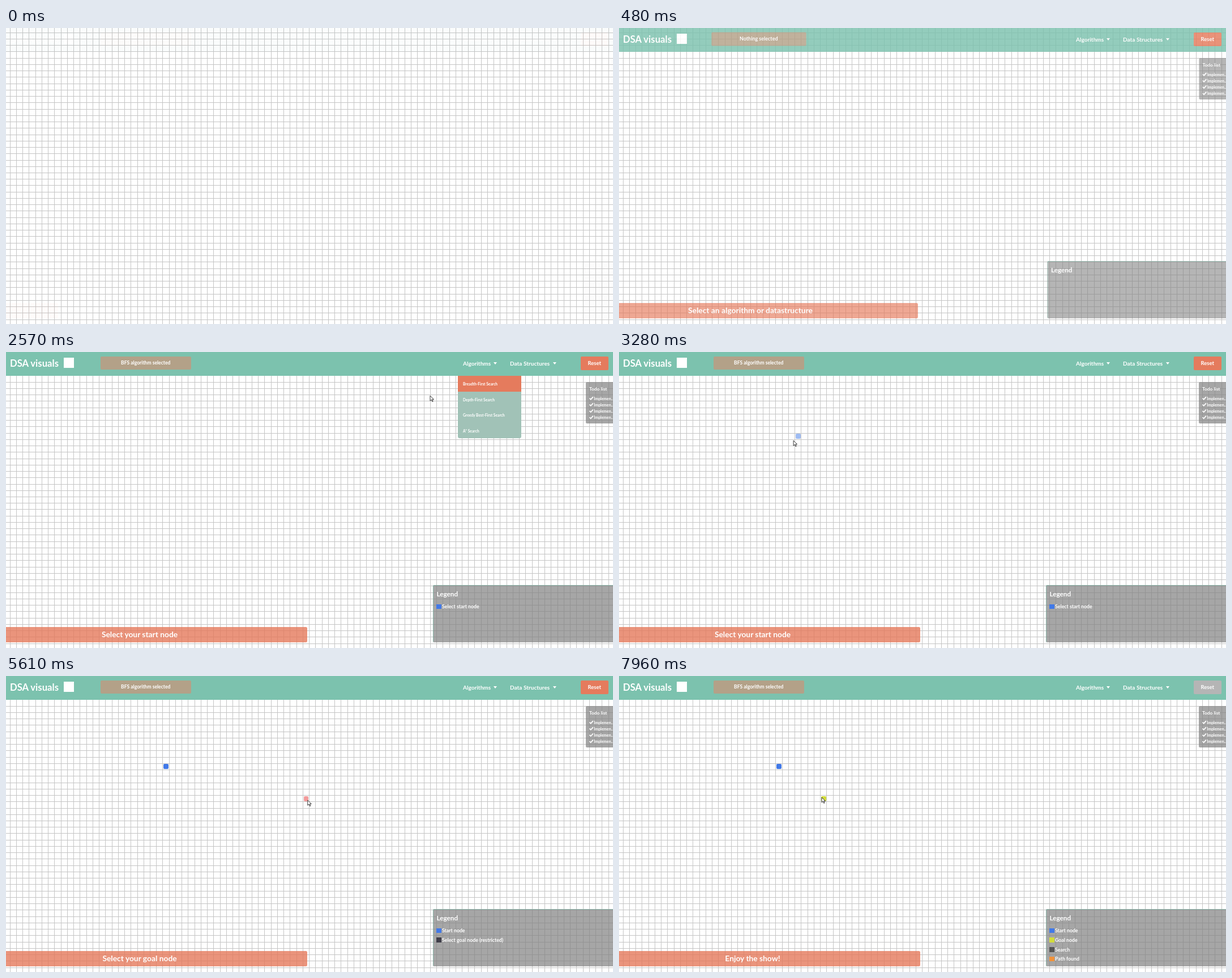
Write an HTML page that moves like this. It is 1072 px wide and 522 px high and loops after 8000 ms.

```html
<!DOCTYPE html>
<html lang="en">
<head>
<meta charset="utf-8">
<title>DSA visuals</title>
<style>
html, body { margin: 0; width: 100%; height: 100%; overflow: hidden; background: #fff; }
#stage { position: relative; width: 1072px; height: 522px; overflow: hidden; color: #fff;
  font: bold 10.1px/1 Lato, "Open Sans", sans-serif; }
#stage * { position: absolute; box-sizing: border-box; }
#stage span { white-space: nowrap; transform: translateY(-50%); }
#stage .mid { left: 50%; top: 50%; transform: translate(-50%, -50%); }
svg { left: 0; top: 0; overflow: visible; }
#grid { stroke: #c5c5c5; shape-rendering: crispEdges; }
.node { width: 8.8px; height: 8.8px; border-radius: 2px; }
#header { width: 1072px; height: 42px; background: #7cc2ae; }
#title { left: 7px; top: 20px; font-size: 16.7px; }
#mark { left: 102px; top: 10px; width: 18px; height: 18px; background: #fff; }
#message { left: 167px; top: 8px; width: 159.5px; height: 22.5px; border-radius: 2px;
  background: #b3a188; font-size: 8.55px; }
.menu { top: 8px; height: 23px; border-radius: 2px; }
.menu span { left: 9px; top: 12px; }
.menu i { right: 9px; top: 10px; border: solid transparent; border-width: 4px 3.6px 0; border-top-color: #fff; }
#algorithms { left: 798px; width: 78px; }
#structures { left: 881px; width: 100px; }
#reset { left: 1015px; top: 8px; width: 48.5px; height: 23.5px; border-radius: 2px; font-size: 9.5px; }
#dropdown { left: 798px; top: 42px; width: 112px; height: 110px; overflow: hidden;
  border-radius: 0 0 3px 3px; background: #a1c2b7; font-size: 6.68px; }
#dropdown div { width: 112px; height: 27.5px; }
#dropdown span { left: 9px; top: 14px; }
.panel { background: rgba(128, 128, 128, .7); border-radius: 2px; }
#todo { left: 1024px; top: 53px; width: 70px; height: 73px; font-size: 6.8px; }
#todo path { fill: none; stroke: #fff; stroke-width: 1.7; }
#legend { left: 754px; top: 411px; width: 400px; height: 101px; font-size: 8.75px;
  box-shadow: inset 1px 1px rgba(124, 194, 174, .6); }
#legend i { left: 6px; width: 8.5px; height: 8.5px; }
#bar { left: -60px; top: 484.5px; width: 592px; height: 27px; border-radius: 2.5px;
  background: rgba(229, 122, 92, .8); font-size: 13.8px; }
#cursor path { fill: #fff; stroke: #222; stroke-width: .9; }
</style>
</head>
<body>
<div id="stage">
  <svg width="1072" height="522"><path id="grid"/></svg>
  <div id="hover" class="node"></div>
  <div id="start" class="node" style="background:#4179e8"></div>
  <div id="goal" class="node" style="background:#d2dc3c"></div>
  <div id="header">
    <span id="title">DSA visuals</span><div id="mark"></div>
    <div id="message"><span class="mid"></span></div>
    <div id="algorithms" class="menu"><span>Algorithms</span><i></i></div>
    <div id="structures" class="menu"><span>Data Structures</span><i></i></div>
    <div id="reset"><span class="mid">Reset</span></div>
  </div>
  <div id="dropdown"></div>
  <div id="todo" class="panel"><span style="left:6px;top:12px;font-size:8.4px">Todo list</span></div>
  <div id="legend" class="panel"><span style="left:6.5px;top:15.5px;font-size:11.7px">Legend</span><div id="rows"></div></div>
  <div id="bar"><span class="mid"></span></div>
  <svg id="cursor" width="8" height="12"><path d="M0 0V9L2.2 7L3.8 10.4L5.2 9.8L3.7 6.5H6.5Z"/></svg>
</div>
<script>
const LOOP = 8000, CELL = 11.245, LEFT = 7.1, TOP = 8.1;
const CURSOR_IN = 520, MENU_OPEN = 760, ITEM_HOVER = 1060, PICKED = 2200,
      MENU_CLOSE = 2640, START_SET = 3560, GOAL_SET = 7700, HOVER_LAG = 30;
const START = [24, 13], GOAL = [31, 18];
const BLUE = '#4179e8', ORANGE = '#e57b5d';

// Pointer positions: time, x, y
const PATH = [
  [520, 905, 120], [820, 855, 31], [960, 854.5, 31], [1430, 838, 57], [2200, 835, 57],
  [2570, 750, 77], [2920, 416, 135], [2990, 414, 136], [3350, 283, 161], [3560, 284, 161],
  [4160, 392, 163], [4300, 412, 165], [4370, 416, 166], [5130, 538, 172], [5260, 540, 172],
  [5500, 534, 212], [5610, 533, 219], [5800, 490, 239], [6020, 426, 230], [6080, 424, 228],
  [6500, 402, 196], [6880, 408, 222], [6950, 402, 220], [7150, 327, 195], [7280, 358, 214]
];
// Feedback while choosing a goal: cell distance limit, hint, swatch, hover colour
const HINTS = [
  [10, 'green light', '#2f9e44', '#91cf96'],
  [13.5, 'might take some time', '#f09a36', '#f6cd97'],
  [Infinity, 'restricted', '#3f3e49', '#f29b9b']
];

const $ = id => document.getElementById(id);
const show = (id, on) => { $(id).style.display = on ? '' : 'none'; };
const label = (id, text) => { $(id).querySelector('.mid').textContent = text; };

function pointerAt(t) {
  const i = PATH.findIndex(p => p[0] > t);
  if (i === 0) return PATH[0].slice(1);
  if (i < 0) return PATH[PATH.length - 1].slice(1);
  const [t0, x0, y0] = PATH[i - 1], [t1, x1, y1] = PATH[i];
  const f = (t - t0) / (t1 - t0);
  return [x0 + (x1 - x0) * f, y0 + (y1 - y0) * f];
}

function placeNode(id, [col, row]) {
  $(id).style.left = LEFT + col * CELL + 1.2 + 'px';
  $(id).style.top = TOP + row * CELL + 1.2 + 'px';
}

function setLegend(rows) {
  $('rows').innerHTML = rows.map(([color, text], i) => {
    const y = 38 + i * 16.8;
    return `<i style="top:${y - 4.5}px;background:${color}"></i><span style="left:16px;top:${y}px">${text}</span>`;
  }).join('');
}

function build() {
  let d = '';
  for (let x = LEFT; x < 1072; x += CELL) d += `M${Math.floor(x) + .5} 0V522`;
  for (let y = TOP; y < 522; y += CELL) d += `M0 ${Math.floor(y) + .5}H1072`;
  $('grid').setAttribute('d', d);
  $('dropdown').innerHTML = ['Breadth-First Search', 'Depth-First Search', 'Greedy Best-First Search', 'A* Search']
    .map((name, i) => `<div style="top:${i * 27.5}px"><span>${name}</span></div>`).join('');
  for (let i = 0; i < 4; i++) {
    const y = 28.5 + i * 11.2;
    $('todo').insertAdjacentHTML('beforeend',
      `<svg width="14" height="73"><path d="M6.5 ${y}l2.2 2.2l4.3 -4.6"/></svg><span style="left:14.5px;top:${y}px">Implemen...</span>`);
  }
  placeNode('start', START);
  placeNode('goal', GOAL);
}

function intro(t) {
  const rest = 1 - Math.min(1, (t + 13) / 850);
  const fade = 1 - rest * rest, slide = rest ** 5.5;
  for (const id of ['header', 'todo', 'legend', 'bar']) $(id).style.opacity = fade;
  for (const [id, dist] of [['bar', -482], ['legend', 288], ['todo', 48]])
    $(id).style.transform = `translateX(${dist * slide}px)`;
  $('message').style.transform = `scale(${1 + .087 * Math.sin(Math.PI * fade)})`;
}

function draw(t) {
  intro(t);
  const [x, y] = pointerAt(t);
  show('cursor', t >= CURSOR_IN);
  $('cursor').style.transform = `translate(${x}px, ${y}px)`;

  show('dropdown', t >= MENU_OPEN && t < MENU_CLOSE);
  $('algorithms').style.background = t >= MENU_OPEN && t < ITEM_HOVER ? ORANGE : '';
  $('dropdown').firstChild.style.background = t >= ITEM_HOVER ? ORANGE : '';
  $('reset').style.background = t >= GOAL_SET ? '#b5b5b5' : ORANGE;
  label('message', t < PICKED ? 'Nothing selected' : 'BFS algorithm selected');
  label('bar', t < PICKED ? 'Select an algorithm or datastructure'
    : t < START_SET ? 'Select your start node'
    : t < GOAL_SET ? 'Select your goal node' : 'Enjoy the show!');

  // The highlighted cell trails slightly behind the pointer
  const [hx, hy] = pointerAt(t - HOVER_LAG);
  const cell = [Math.floor((hx - LEFT) / CELL), Math.floor((hy - TOP) / CELL)];
  const distance = Math.hypot(cell[0] - START[0], cell[1] - START[1]);
  const [, hint, swatch, tint] = HINTS.find(h => distance <= h[0]);
  placeNode('hover', cell);
  show('hover', t >= MENU_CLOSE && t < GOAL_SET);
  $('hover').style.background = t < START_SET ? '#9fbcf3' : tint;
  show('start', t >= START_SET);
  show('goal', t >= GOAL_SET);

  setLegend(t < PICKED ? []
    : t < START_SET ? [[BLUE, 'Select start node']]
    : t < GOAL_SET ? [[BLUE, 'Start node'], [swatch, `Select goal node (${hint})`]]
    : [[BLUE, 'Start node'], ['#d2dc3c', 'Goal node'], ['#555', 'Search'], ['#f0923a', 'Path found']]);
}

build();
const began = performance.now();
function tick() {
  draw((performance.now() - began) % LOOP);
  requestAnimationFrame(tick);
}
tick();
</script>
</body>
</html>
```
